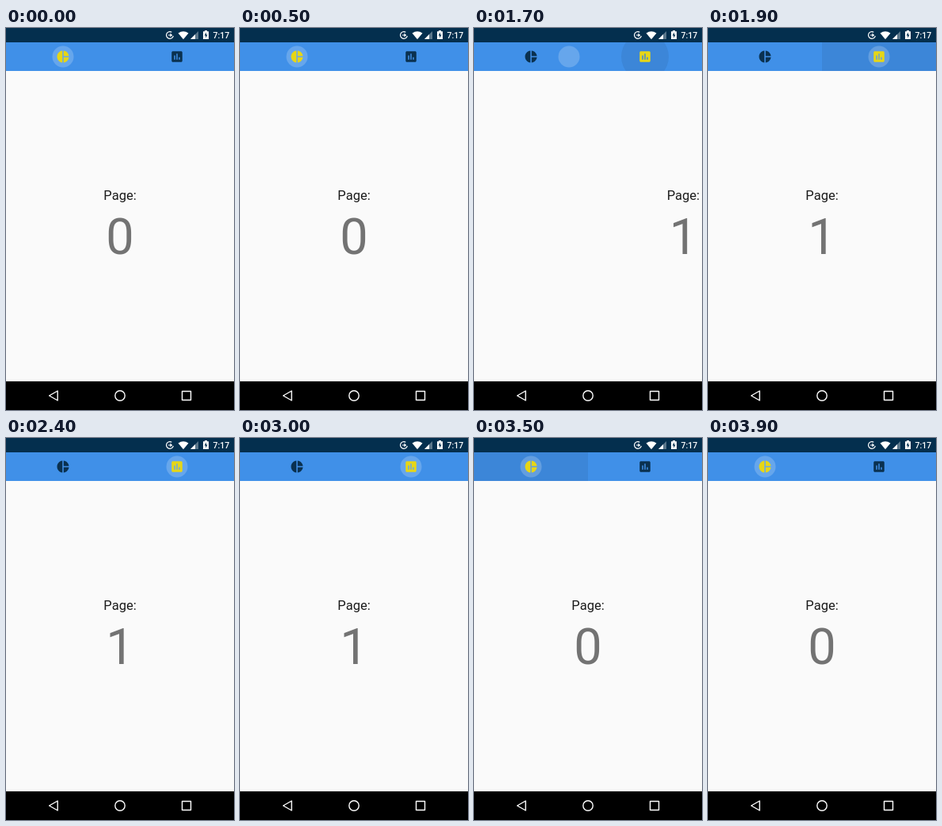
Write an HTML page that moves like this. It is 288 px wide and 480 px high and loops after 4.2 s.

```html
<!DOCTYPE html>
<html lang="en">
<head>
<meta charset="utf-8">
<title>Tab pages</title>
<style>
  html, body { margin: 0; width: 100%; height: 100%; overflow: hidden; background: #fafafa; }
  svg { display: block; width: 288px; height: 480px; font-family: Roboto, sans-serif; }
  .page { text-anchor: middle; }
  .label { font-size: 16.5px; fill: #1c1c1c; }
  .digit { font-size: 63px; fill: #737373; }
</style>
</head>
<body>
<svg viewBox="0 0 288 480">
  <clipPath id="left"><path d="M0 18h144v36H0z"/></clipPath>
  <clipPath id="right"><path d="M144 18h144v36H144z"/></clipPath>

  <rect width="288" height="480" fill="#fafafa"/>
  <g class="page"><text class="label" x="144" y="216">Page:</text><text class="digit" x="144" y="284">0</text></g>
  <g class="page"><text class="label" x="144" y="216">Page:</text><text class="digit" x="144" y="284">1</text></g>

  <!-- tab bar -->
  <rect y="18" width="288" height="36" fill="#4090e8"/>
  <g clip-path="url(#left)"><circle class="ripple" cx="77" cy="36"/></g>
  <g clip-path="url(#right)"><circle class="ripple" cx="216" cy="36"/></g>
  <circle id="bubble" cy="36" r="13.5" fill="#fff" fill-opacity=".2"/>
  <path class="icon" transform="translate(63 27) scale(.75)" d="M11 2v20c-5.07-.5-9-4.79-9-10s3.93-9.5 9-10zm2.03 0v8.99H22c-.47-4.74-4.24-8.52-8.97-8.99zm0 11.01V22c4.74-.47 8.5-4.25 8.97-8.99z"/>
  <path class="icon" transform="translate(207 27) scale(.75)" d="M19 3H5c-1.1 0-2 .9-2 2v14c0 1.1.9 2 2 2h14c1.1 0 2-.9 2-2V5c0-1.1-.9-2-2-2zM9 17H7v-7h2zm4 0h-2V7h2zm4 0h-2v-4h2z"/>

  <!-- status bar -->
  <rect width="288" height="18" fill="#042f4e"/>
  <g fill="#fff">
    <path d="M209.3 5.2A4.4 4.4 0 1 0 211.3 9.8" fill="none" stroke="#fff" stroke-width="1.2"/>
    <path d="M205 8.4h2.4V6.6l2.8 2.4-2.8 2.4V9.6H205z"/>
    <path d="M217.5 6.6Q224 1.8 230.5 6.6L224 14.3z"/>
    <path d="M243 4v10h-10z" fill-opacity=".35"/>
    <path d="M239 8v6h-6z"/>
    <path d="M249 4.2h2V3h3v1.2h2V14h-7z"/>
    <path d="M253 5.6l-2.4 4h1.6v3l2.4-4H253z" fill="#042f4e"/>
    <text x="261.5" y="12.8" font-size="10.5" font-weight="500">7:17</text>
  </g>

  <!-- navigation bar -->
  <rect y="444" width="288" height="36"/>
  <g fill="none" stroke="#fff" stroke-width="1.4" stroke-linejoin="round">
    <path d="M54.6 462l10.6-6v12z"/>
    <circle cx="144" cy="462" r="6.2"/>
    <path d="M222.5 456.5h11v11h-11z"/>
  </g>
</svg>
<script>
  const LOOP = 4200, STEP = 100, SLIDE = 300, RIPPLE = 500;
  const taps = [3200, 1600]; // tap time of each tab
  const all = s => document.querySelectorAll(s);
  const pages = all('.page'), icons = all('.icon'), ripples = all('.ripple');
  const bubble = document.getElementById('bubble');
  const clamp = x => Math.max(0, Math.min(1, x));
  const ease = x => 1 - (1 - x) ** 2.15;

  function draw(t) {
    const [back, forth] = taps.map(tap => clamp((t - tap) / SLIDE));
    const scroll = ease(forth) - ease(back);
    const active = forth > 0 && back === 0 ? 1 : 0;

    bubble.setAttribute('cx', 72 + 144 * (forth - back));
    taps.forEach((tap, i) => {
      const age = t - tap, on = age > 0 && age < RIPPLE;
      pages[i].setAttribute('transform', `translate(${288 * (i - scroll)})`);
      icons[i].setAttribute('fill', i === active ? '#e6d616' : '#0a3150');
      ripples[i].setAttribute('r', on ? age * .3 : 0);
      ripples[i].setAttribute('fill-opacity', .07 * clamp((RIPPLE - age) / 200));
    });
  }

  const start = performance.now();
  function tick() {
    const t = (performance.now() - start) % LOOP;
    draw(Math.floor(t / STEP) * STEP);
    requestAnimationFrame(tick);
  }
  tick();
</script>
</body>
</html>
```
